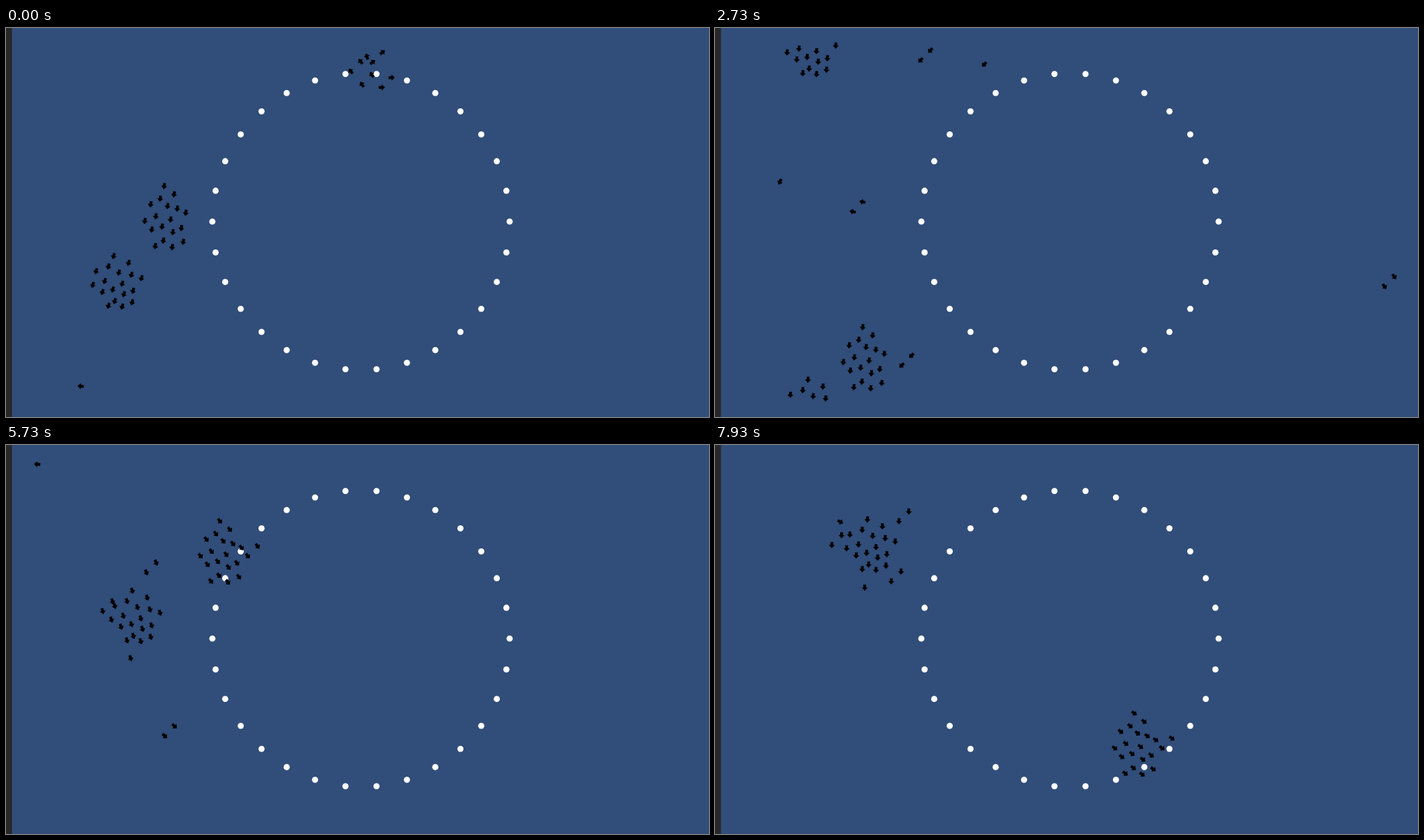
An HTML page with a canvas for the animation above (8 s loop, 1005 by 557 pixels).

```html
<!DOCTYPE html>
<html lang="en">
<head>
<meta charset="utf-8">
<title>Flock</title>
<style>
  html, body { margin: 0; width: 100%; height: 100%; overflow: hidden; background: #314d79; }
  canvas { display: block; }
</style>
</head>
<body>
<canvas id="stage" width="1005" height="557"></canvas>
<script>
const ctx = document.getElementById('stage').getContext('2d');
const LOOP = 8000, HOLD = 200, STEP = 200 / 3;
const FIELD = { x: 12, y: 22, w: 990, h: 510 };
const GOLDEN = Math.PI * (3 - Math.sqrt(5));

// Steps at which every path passes its next waypoint
const KEYS = [0, 20, 39, 55, 71, 96, 117];

// Centres of the two flocks; positions outside the field wrap around
const east = [[230, 274], [213, 379], [215, 476], [171, 727], [189, 992], [435, 1320], [603, 1452]];
const west = [[160, 366], [137, 442], [139, 543], [109, 793], [129, 1061], [233, 1444], [224, 1676]];

// A stray flies its own way, then keeps a fixed place beside a flock
function join(flock, dx, dy, ...way) {
  return [...way, ...flock.slice(way.length).map(([x, y]) => [x + dx, y + dy])];
}

// Evenly filled oval, narrowing downwards by taper
function oval(n, rx, ry, taper) {
  return Array.from({ length: n }, (_, i) => {
    const r = Math.sqrt((i + .5) / n), a = i * GOLDEN;
    const y = r * Math.sin(a);
    return [rx * r * Math.cos(a) * (1 - taper * y), ry * y];
  });
}

const single = [[0, 0]];
const pair = [[-7, 7], [7, -7]];

const groups = [
  { path: east, birds: oval(18, 32, 52, 0) },
  { path: west, birds: oval(18, 37, 43, .4) },
  { path: join(east, 43, -5, [500, 565], [442, 493], [274, 476]), birds: pair },
  { path: join(west, 35, 42, [516, 584], [452, 492], [301, 549], [79, 912], [178, 1334]), birds: pair },
  { path: join(west, -50, -10, [-446, 588], [-292, 582], [-26, 873], [-60, 885]), birds: pair },
  { path: join(west, 46, -44, [531, 1062], [641, 974], [204, 766], [-52, 819], [101, 973]), birds: pair },
  { path: join(west, -10, 58, [516, 551], [482, 458], [385, 562], [76, 864]), birds: single },
  { path: join(west, -45, -36, [107, 1023], [85, 1021], [93, 1240], [-63, 1362], [62, 1537], [32, 1562]), birds: single }
];

function slope(path, i, axis) {
  const a = Math.max(i - 1, 0), b = Math.min(i + 1, KEYS.length - 1);
  return (path[b][axis] - path[a][axis]) / (KEYS[b] - KEYS[a]);
}

// Smooth cubic through the waypoints
function locate(path, step) {
  let i = 0;
  while (i < KEYS.length - 2 && step >= KEYS[i + 1]) i++;
  const span = KEYS[i + 1] - KEYS[i];
  const u = (step - KEYS[i]) / span, w = 1 - u;
  return [0, 1].map(axis =>
    w * w * (1 + 2 * u) * path[i][axis] + u * u * (3 - 2 * u) * path[i + 1][axis]
    + span * u * w * (w * slope(path, i, axis) - u * slope(path, i + 1, axis)));
}

function wrap(v, low, size) {
  return low + ((v - low) % size + size) % size;
}

const arrow = new Path2D('M0 -4.8L4.4 0H2V4.2H-2V0H-4.4Z');

function drawBird(x, y, angle) {
  ctx.save();
  ctx.translate(wrap(x, FIELD.x, FIELD.w), wrap(y, FIELD.y, FIELD.h));
  ctx.rotate(angle);
  ctx.fill(arrow);
  ctx.restore();
}

function drawGroup({ path, birds }, step) {
  const [x, y] = locate(path, step);
  const [x0, y0] = locate(path, step - .5);
  const [x1, y1] = locate(path, step + .5);
  const heading = Math.atan2(x1 - x0, y0 - y1);
  for (const [dx, dy] of birds) drawBird(x + dx, y + dy, heading);
}

function drawScene() {
  ctx.fillStyle = '#314d79';
  ctx.fillRect(0, 0, 1005, 557);
  ctx.fillStyle = '#282828';
  ctx.fillRect(0, 0, 8.5, 557);
  ctx.fillStyle = '#fff';
  for (let i = 0; i < 30; i++) {
    const a = i * Math.PI / 15;
    ctx.beginPath();
    ctx.arc(507.5 + 212.5 * Math.cos(a), 277.2 + 212.5 * Math.sin(a), 4.4, 0, 2 * Math.PI);
    ctx.fill();
  }
}

function render(ms) {
  const t = ms % LOOP;
  const last = KEYS[KEYS.length - 1];
  const step = t < HOLD ? 0 : Math.min(last, 1 + Math.floor((t - HOLD + 3.4) / STEP));
  drawScene();
  ctx.fillStyle = '#000';
  for (const group of groups) drawGroup(group, step);
}

const start = performance.now();
function tick() {
  render(performance.now() - start);
  requestAnimationFrame(tick);
}
tick();
</script>
</body>
</html>
```
